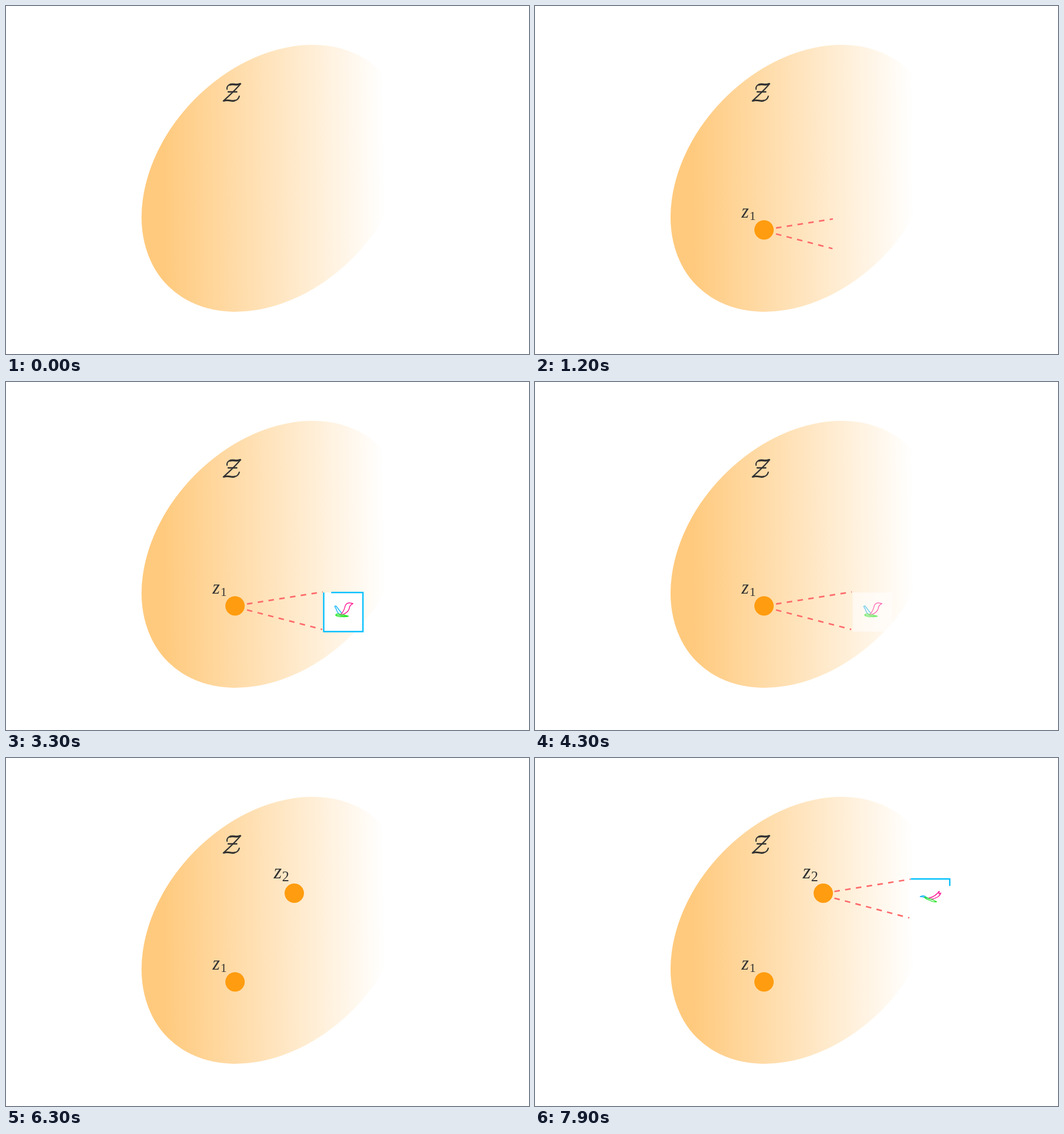
An HTML page that plays this animation: 918 by 610 pixels, repeating every 8 s.

```html
<!DOCTYPE html>
<html lang="en">
<head>
<meta charset="utf-8">
<title>Latent space</title>
<style>
  html, body { margin: 0; width: 100%; height: 100%; overflow: hidden; background: #fff; }
  svg { display: block; width: 918px; height: 610px; }
  text { font-family: "Liberation Serif", "Times New Roman", serif; fill: #333; }
  .var { font-style: italic; }
  .dot { fill: #ff9c0f; }
  .ray { stroke: #ff6b6b; stroke-width: 2.7; stroke-dasharray: 9.7 9.4; }
  .frame { fill: none; stroke: #00bfff; stroke-width: 2.4; }
  .card { fill: #fff; }
  .bird path { fill: none; stroke-width: 1.4; stroke-linejoin: round; stroke-linecap: round; }
  .pink { stroke: #ff1493; }
  .blue { stroke: #14b4f5; }
  .green { stroke: #2ee62e; }
</style>
</head>
<body>
<svg viewBox="0 0 918 610">
  <defs>
    <linearGradient id="sand" gradientUnits="userSpaceOnUse" x1="333" y1="164.500" x2="608" y2="439.500">
      <stop offset="0" stop-color="#ffca7e"/>
      <stop offset="1" stop-color="#fff"/>
    </linearGradient>
  </defs>
  <path id="space" fill="url(#sand)"/>

  <!-- script Z -->
  <g fill="none" stroke="#333" stroke-linecap="round" stroke-linejoin="round" role="img" aria-label="Z">
    <path stroke-width="2" d="M388 146C387 142 390 138 394 137.500"/>
    <path stroke-width="3.400" d="M393 138C399 135.500 404 140 411 136.500"/>
    <path stroke-width="2.200" d="M411.500 136.500C403 147 392 157 381.500 166.500"/>
    <path stroke-width="3.200" d="M383 166C390 163.500 395 167.500 401 166"/>
    <path stroke-width="2.200" d="M401 166C406 165 408.500 162 409.500 158"/>
    <path stroke-width="2.400" d="M390 150.500L405 150.500"/>
  </g>

  <g id="point1">
    <text class="var" x="362.500" y="370.500" font-size="33">z</text>
    <text x="376.500" y="375" font-size="22">1</text>
    <circle class="dot" cx="402" cy="392.500" r="17"/>
  </g>
  <g id="point2">
    <text class="var" x="470" y="210.500" font-size="36">z</text>
    <text x="484.500" y="215.500" font-size="25">2</text>
    <circle class="dot" cx="506" cy="237" r="17"/>
  </g>

  <g id="bird1" class="bird">
    <rect class="card" x="557.700" y="369" width="68.800" height="68.500"/>
    <path class="blue" d="M577 393.500Q578.500 391.500 580 393.500Q584 399 589 405M577 393.500Q579.500 397 581 401.500T587 408"/>
    <path class="pink" d="M587 408C594 402 594 396 596 391C599 386 604 387 609 388.500C605 390 603 392 602.500 397C601 403 597 406 589 408"/>
    <path class="green" d="M579 407.500C583 404.500 587 408 592 408L601 410.500C596 412.500 592 411 588 411.500C584 411.500 580 411 578.500 408.500L600 411"/>
  </g>
  <g id="bird2" class="bird">
    <rect class="card" x="658.500" y="211" width="69" height="69"/>
    <path class="blue" d="M676 243Q680 240.500 684 242L690 246Q684 245 681 243.500Z"/>
    <path class="pink" d="M691 245.500C697 244.500 704 241 709.500 233.500L709 238.500L712.500 236.500C711.500 240 709 242 707 243.500Q701 247 695 247.500"/>
    <path class="green" d="M684 243.500Q690 246 695 247.500T705 252Q698 253 692 249Q687 248 684 245Z"/>
  </g>

  <g id="rays1"><line class="ray"/><line class="ray"/></g>
  <g id="rays2"><line class="ray"/><line class="ray"/></g>
  <path id="frame1" class="frame" d="M557.700 369h68.800v68.500h-68.800z"/>
  <path id="frame2" class="frame" d="M659.500 212h68.500v68.500h-68.500z"/>
</svg>
<script>
const LOOP = 8000, STEP = 100, NEVER = [9000, 9001];
const $ = id => document.getElementById(id);
const ramp = (t, [a, b]) => Math.min(1, Math.max(0, (t - a) / (b - a)));

// Tilted ellipse
const [cx, cy, a, b, tilt] = [470.5, 302, 265, 196.5, -45.6];
$("space").setAttribute("d", `M${cx - a} ${cy}a${a} ${b} 0 1 1 ${2 * a} 0a${a} ${b} 0 1 1 ${-2 * a} 0z`);
$("space").setAttribute("transform", `rotate(${tilt} ${cx} ${cy})`);

const fade = (id, t, enter, leave) =>
  $(id).setAttribute("opacity", ramp(t, enter) - ramp(t, leave));

function growRays(id, rays, t, enter, leave) {
  const k = ramp(t, enter) - ramp(t, leave);
  [...$(id).children].forEach((line, i) => {
    const [x1, y1, x2, y2] = rays[i];
    const ends = { x1, y1, x2: x1 + (x2 - x1) * k, y2: y1 + (y2 - y1) * k };
    for (const key in ends) line.setAttribute(key, ends[key]);
    line.style.visibility = k > 0 ? "visible" : "hidden";
  });
}

// Drawn clockwise from the top left, erased in the same direction
function traceFrame(id, t, enter, leave) {
  const el = $(id), len = el.getTotalLength();
  const head = ramp(t, enter) * len, tail = ramp(t, leave) * len;
  el.style.visibility = head > tail ? "visible" : "hidden";
  el.setAttribute("stroke-dasharray",
    head - tail >= len ? "none" : `0 ${tail} ${head - tail} 999`);
}

const scenes = [
  {
    n: 1,
    rays: [[423, 389.2, 556, 368], [423, 399.5, 555, 433.7]],
    point: [0, 350],
    grow: [674, 1374], shrink: [4445, 5110],
    trace: [1300, 2116], erase: [3252, 4257],
    show: [2116, 2500], hide: [4200, 4445]
  },
  {
    n: 2,
    rays: [[525.5, 234, 659, 212.5], [525.5, 245.7, 657, 280.3]],
    point: [5900, 6250],
    grow: [6540, 7240], shrink: NEVER,
    trace: [7605, 8605], erase: NEVER,
    show: [7240, 7600], hide: NEVER
  }
];

function draw(t) {
  for (const s of scenes) {
    fade("point" + s.n, t, s.point, NEVER);
    fade("bird" + s.n, t, s.show, s.hide);
    growRays("rays" + s.n, s.rays, t, s.grow, s.shrink);
    traceFrame("frame" + s.n, t, s.trace, s.erase);
  }
}

const start = performance.now();
function tick() {
  const t = (performance.now() - start) % LOOP;
  draw(Math.floor(t / STEP) * STEP);
  requestAnimationFrame(tick);
}
tick();
</script>
</body>
</html>
```
